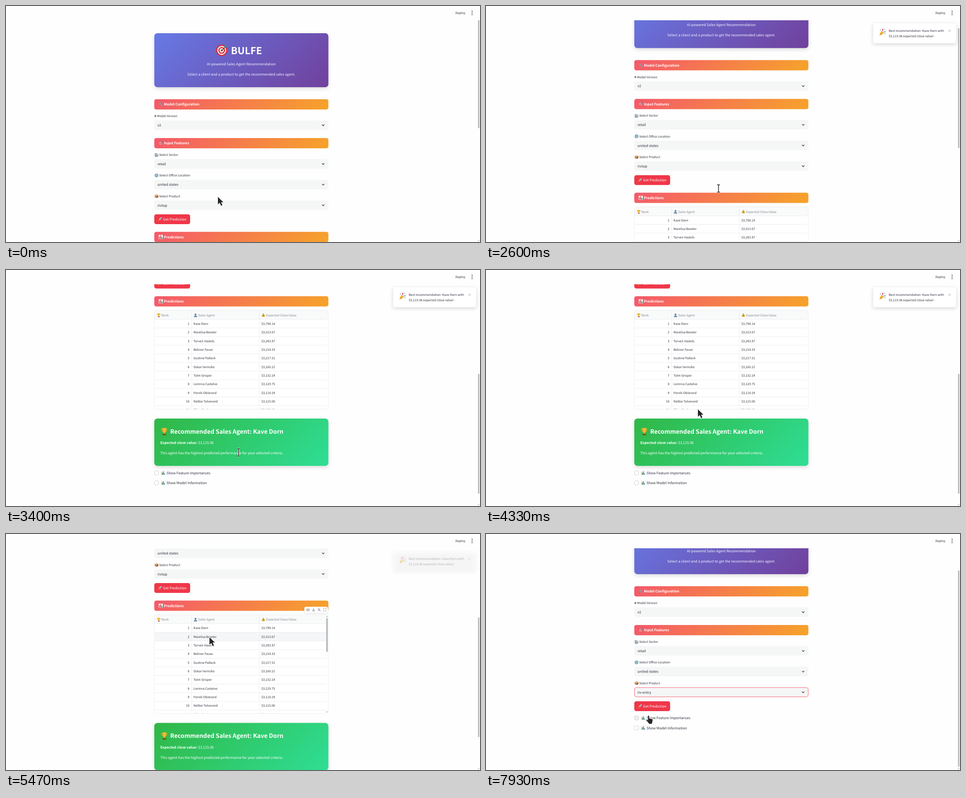
These frames come from a looping animation (1058x529 px, 8 s). An HTML page with a canvas:

```html
<!DOCTYPE html>
<html lang="en">
<head>
<meta charset="utf-8">
<title>Sales agent recommendation</title>
<style>
html, body { margin: 0; width: 100%; height: 100%; overflow: hidden; background: #fefefe; }
canvas { display: block; width: 1058px; height: 529px; font-family: 'Noto Sans CJK SC', sans-serif; }
</style>
</head>
<body>
<canvas id="stage"></canvas>
<script>
const W = 1058, H = 529, LOOP = 8000;
const LEFT = 331, WIDTH = 388.6, RIGHT = LEFT + WIDTH;
const INK = '#31333f', RED = '#ef3749';
const FAMILY = "'Noto Sans CJK SC','Noto Sans CJK JP','Noto Sans',sans-serif";
const LATIN_SCALE = 1.117; // CJK faces draw Latin larger than their nominal size

const canvas = document.getElementById('stage');
const dpr = window.devicePixelRatio || 1;
canvas.width = W * dpr;
canvas.height = H * dpr;
const ctx = canvas.getContext('2d');

const AGENTS = [
  ['Kave Dorn', '$3,798.14'], ['Marelisa Bowter', '$3,313.67'], ['Torven Haskils', '$3,283.87'],
  ['Belinor Fause', '$3,218.33'], ['Gustine Pallock', '$3,217.51'], ['Oskar Verindio', '$3,160.21'],
  ['Tolm Grisper', '$3,132.24'], ['Lorinna Castelvo', '$3,129.75'], ['Fenrik Obstrand', '$3,118.29'],
  ['Nelbie Tolverand', '$3,115.06'], ['Elbin Dosk', '$3,108.42']
];
const BEST = AGENTS[0][0];
const PRODUCTS = ['riv dual entry', 'rivtop', 'ob limited', 'riv entry', 'riv dual top', 'ob enhanced', 'ruk 300'];

// ---- icons on a 16 unit grid: [fill, path] layers ----
const dot = (x, y, r) => `M${x - r} ${y}a${r} ${r} 0 1 0 ${2 * r} 0a${r} ${r} 0 1 0 ${-2 * r} 0`;
const gearTeeth = Array.from({ length: 8 }, (_, i) => {
  const a = i * Math.PI / 4;
  return dot(8 + 6.3 * Math.cos(a), 8 + 6.3 * Math.sin(a), 1.5);
}).join('');
const ICONS = {
  target: [['#d72f3c', dot(7.7, 8.3, 7.5)], ['#f7f3f2', dot(7.7, 8.3, 5.9)], ['#d72f3c', dot(7.7, 8.3, 4.5)],
    ['#f7f3f2', dot(7.7, 8.3, 2.9)], ['#d72f3c', dot(7.7, 8.3, 1.4)], ['#3a3f4c', 'M7.4 8.3L12 3.6l.7.7L7.9 8.9z'],
    ['#3f86a8', 'M11.2 4.8L11.5 2.4 14 .2l.4 1.5 1.5.5-2.2 2.4z']],
  wrench: [['#8a9db0', 'M1 4.5a4 4 0 0 0 5.5 3.8L12 14.5a1.7 1.7 0 0 0 2.6-2.4L8.5 6.4A4 4 0 0 0 4 1l1.6 2.5-1.9 2z']],
  robot: [['#4a4c58', dot(8, 8.5, 6) + 'M7.2 0h1.6v4H7.2z'], ['#e5e6ea', 'M4 6h8v1.5H4zM4 9.5h8V11H4z']],
  building: [['#9aa3ab', 'M1 2h9v13H1zM10 5h5v10h-5z'], ['#e3edf2', 'M3 4h2v2H3zM6.5 4h2v2h-2zM3 8h2v2H3zM6.5 8h2v2h-2zM11.5 7h2v2h-2zM11.5 11h2v2h-2z'], ['#6a7077', 'M4.5 12h2.5v3H4.5z']],
  gear: [['#6c98ad', gearTeeth + dot(8, 8, 6)], ['#d5e5eb', dot(8, 8, 3.7)], ['#6c98ad', dot(8, 8, 2)]],
  box: [['#c28d58', 'M1 4.5L8 7.5v8L1 12.5z'], ['#96653b', 'M15 4.5L8 7.5v8l7-3z'], ['#d8aa74', 'M8 1.2l7 3.3-7 3-7-3z'], ['#ecd3ae', 'M4 2.9l7 3.2v2L9.4 7 2.8 3.6z']],
  rocket: [['#e66a35', 'M2 9l4-2-1.5 4.5zM9 14l-2-2 3-3z'], ['#cfd6dd', 'M15 1c-5 0-8 3-10 8l2 2c5-2 8-5 8-10z'], ['#3d6f92', dot(10.5, 5.5, 1.7)], ['#f6b42f', 'M1 15l1-4 3 3z']],
  chart: [['#cfd8dd', 'M.5.5h15v15H.5z'], ['#f8fafb', 'M1.3 1.3h13.4v13.4H1.3z'], ['#3da85a', 'M2.5 6h3v8.7h-3z'], ['#d94b48', 'M6.6 2.3h3v12.4h-3z'], ['#3f86c6', 'M10.7 8.5h3v6.2h-3z']],
  trophy: [['#d98b1f', 'M1 2.5h14c0 4-2 6-4 6H5C3 8.5 1 6.5 1 2.5zM2.4 4c.4 2 1.3 3 2.3 3.2V4zM13.6 4h-2.3v3.2c1-.2 1.9-1.2 2.3-3.2z'], ['#f7b92f', 'M3.8 1h8.4c0 5-1 8.5-3.3 9.3V13H7.1v-2.7C4.800 9.500 3.800 6 3.800 1z'], ['#7b4b2b', 'M4.500 12.500h7V15.500h-7z']],
  person: [['#5b87a0', dot(8, 5, 3.8) + 'M1.500 15.500c0-8 13-8 13 0z']],
  money: [['#e0b64a', 'M6 4h4c4 3 5 6 4.500 8.500C14 15.500 2 15.500 1.500 12.500 1 10 2 7 6 4z'], ['#c9962f', 'M5 1l3 1 3-1-1 3H6z'], ['#5e8d4a', dot(8, 10, 2.300)]],
  party: [['#f2b632', 'M1 15.500L5 5.500c3 .5 5.500 3 6 6z'], ['#d98a2c', 'M3 10.500l3.500 3-2 .8-2.300-2z'], ['#d94d57', 'M8 6C6 4 8 2 6.500.5L8 .3c2 2 0 4 1.500 5z' + dot(12, 2, .9)], ['#4b92cc', 'M10 8c2-2 3-.5 5.500-2v1.500C13 9 12 7.500 10.500 9z' + dot(3.500, 3, .9)], ['#67ab58', dot(13.500, 11.500, 1) + dot(10, 2.700, .7)]]
};
for (const name in ICONS) ICONS[name] = ICONS[name].map(([fill, d]) => [fill, new Path2D(d)]);

const ARROW = new Path2D('M0 0V16.500L4 13l3 6.700 3-1.300-3-6.500h5.200z');
const HAND = new Path2D('M1.500 1.500c0-1.700 2.800-1.700 2.800 0V7l1-.4 1.900.7 1-.2 1.500.8c1.800-.2 2.300.7 2.100 2.400-.2 3-1 4.500-1.400 8.300H3.700c-.4-3-3.500-4.500-5.700-7.600-.7-1.500.9-2.200 2-1.300l1.500 1.300z');
const BEAM = new Path2D('M-3 -8.200h2q1 0 1 1q0-1 1-1h2M0 -7.500V7.500M-3 8.200h2q1 0 1-1q0 1 1 1h2');

// ---- drawing helpers ----
function text(str, x, y, size = 8.8, { color = INK, bold = false, align = 'left' } = {}) {
  ctx.font = `${bold ? 700 : 400} ${size / LATIN_SCALE}px ${FAMILY}`;
  ctx.textAlign = align;
  ctx.fillStyle = color;
  ctx.fillText(str, x, y + size * 0.33);
  return ctx.measureText(str).width;
}
function rect(x, y, w, h, fill, r = 0) {
  ctx.beginPath();
  ctx.roundRect(x, y, w, h, r);
  ctx.fillStyle = fill;
  ctx.fill();
}
function border(x, y, w, h, r, color, width = 0.8) {
  ctx.beginPath();
  ctx.roundRect(x, y, w, h, r);
  strokeWith(color, width);
}
function strokeWith(color, width, path) {
  ctx.strokeStyle = color;
  ctx.lineWidth = width;
  path ? ctx.stroke(path) : ctx.stroke();
}
function line(color, width, ...points) {
  ctx.beginPath();
  points.forEach(([x, y]) => ctx.lineTo(x, y));
  strokeWith(color, width);
}
function shadowed(blur, dy, alpha, draw) {
  ctx.save();
  ctx.shadowColor = `rgba(0,0,0,${alpha})`;
  ctx.shadowBlur = blur * dpr;
  ctx.shadowOffsetY = dy * dpr;
  draw();
  ctx.restore();
}
function diagonal(x, y, w, h, from, to) {
  const d = (w + h) / 4, cx = x + w / 2, cy = y + h / 2;
  const g = ctx.createLinearGradient(cx - d, cy - d, cx + d, cy + d);
  g.addColorStop(0, from);
  g.addColorStop(1, to);
  return g;
}
function icon(name, cx, cy, size) {
  ctx.save();
  ctx.translate(cx - size / 2, cy - size / 2);
  ctx.scale(size / 16, size / 16);
  for (const [fill, path] of ICONS[name]) {
    ctx.fillStyle = fill;
    ctx.fill(path);
  }
  ctx.restore();
}
function triangle(x, y, dir) {
  ctx.beginPath();
  ctx.moveTo(x - 1.6, y - dir);
  ctx.lineTo(x + 1.6, y - dir);
  ctx.lineTo(x, y + dir);
  ctx.fillStyle = '#8b8d92';
  ctx.fill();
}

// ---- motion ----
const clamp = v => Math.max(0, Math.min(1, v));
const smooth = v => { v = clamp(v); return v * v * (3 - 2 * v); };
const span = (t, a, b) => smooth((t - a) / (b - a));

const NOTCH = 89.5, BOTTOM = 5 * NOTCH, SHORT_MAX = 92;
const WHEEL = [2440, 2590, 2735, 2910, 3170];
const OPEN = 5980, PICK = 6870, RERUN = 7000;

function scrollAt(t) {
  if (t >= RERUN) return SHORT_MAX;
  const down = WHEEL.reduce((sum, start) => sum + NOTCH * span(t, start, start + 180), 0);
  return down - 90.5 * span(t, 4680, 4900);
}
const MOVES = [
  [0, 473, 428], [270, 519, 409], [3400, 519, 409], [4130, 481, 325], [4650, 457, 287],
  [5330, 457, 287], [5730, 447, 92], [6000, 447, 92], [6330, 421, 169], [6500, 421, 177],
  [6900, 421, 177], [7930, 360, 407]
];
function pointerAt(t) {
  let i = 0;
  while (i < MOVES.length - 2 && t >= MOVES[i + 1][0]) i++;
  const [t0, x0, y0] = MOVES[i], [t1, x1, y1] = MOVES[i + 1], k = span(t, t0, t1);
  return [x0 + (x1 - x0) * k, y0 + (y1 - y0) * k];
}
const SHAPES = [[0, 'arrow'], [200, 'beam'], [3560, 'arrow'], [5640, 'beam'], [6090, 'hand'], [6950, 'arrow'], [7600, 'hand']];
const shapeAt = t => SHAPES.filter(([start]) => t >= start).pop()[1];

// ---- page parts, in page coordinates ----
function banner() {
  shadowed(9, 3, 0.15, () => rect(LEFT, 61, WIDTH, 121, diagonal(LEFT, 61, WIDTH, 121, '#667ae5', '#71409c'), 7));
  icon('target', 482, 99, 27);
  text('BULFE', 502, 100, 24.2, { color: '#fff', bold: true });
  const white = { color: '#f7f6fc', align: 'center' };
  text('AI-powered Sales Agent Recommendation', 525.3, 130, 8.8, white);
  text('Select a client and a product to get the recommended sales agent.', 525.3, 153, 8.8, white);
}
function section(y, name, title) {
  rect(LEFT, y, WIDTH, 23, diagonal(LEFT, y, WIDTH, 23, '#f4586b', '#f6a429'), 4.5);
  icon(name, 345.5, y + 11.5, 10);
  text(title, 352.5, y + 11.5, 8.8, { color: '#fff', bold: true });
}
function select(y, name, label, value, focused) {
  const small = name === 'robot';
  icon(name, small ? 333.5 : 336, y - 20.5, small ? 5.5 : 9.5);
  text(label, small ? 337.3 : 342, y - 20.5, 7.7);
  rect(LEFT, y - 10.7, WIDTH, 21.4, '#f5f6f6', 4.5);
  if (focused) border(LEFT + 0.4, y - 10.4, WIDTH - 0.8, 20.8, 4.5, '#f0525f', 0.9);
  text(value, 338, y);
  line(INK, 1.3, [705.4, y - 1.4], [708, y + 1.3], [710.6, y - 1.4]);
}
function button() {
  rect(LEFT, 467, 80, 22, RED, 4.5);
  icon('rocket', 343.5, 478, 9.5);
  text('Get Prediction', 350.5, 478, 8.8, { color: '#fff' });
}

const TABLE = { top: 538, head: 558, bottom: 759.5, row: 19.35 };
function table(hoverRow) {
  const { top, head, bottom, row } = TABLE, grid = '#e9eaec';
  ctx.save();
  ctx.beginPath();
  ctx.roundRect(LEFT, top, WIDTH, bottom - top, 4.5);
  ctx.clip();
  rect(LEFT, top, WIDTH, bottom - top, '#fff');
  rect(LEFT, top, WIDTH, head - top, '#f9fafa');
  const gray = { color: '#84868f' };
  [['trophy', 341, 'Rank', 347], ['person', 423, 'Sales Agent', 429], ['money', 574.5, 'Expected Close Value', 580.7]]
    .forEach(([name, ix, title, x]) => { icon(name, ix, top + 10.7, 9); text(title, x, top + 10.7, 7.7, gray); });
  AGENTS.forEach(([agent, value], i) => {
    const y = head + i * row, mid = y + 9.8;
    if (i === hoverRow) rect(LEFT, y, 385, row, '#f5f6f7');
    line(grid, 0.8, [LEFT, y], [716, y]);
    text(i + 1, 409.3, mid, 7.7, { align: 'right' });
    text(agent, 418.5, mid, 7.7);
    text(value, 570, mid, 7.7);
  });
  for (const x of [414.5, 565.5]) line(grid, 0.8, [x, top], [x, bottom]);
  if (hoverRow >= 0) {
    rect(714.8, top + 7.5, 3.4, 75.5, '#b4b6b9', 1.5);
    triangle(716.5, top + 4, -1);
    triangle(716.5, bottom - 3.5, 1);
  }
  ctx.restore();
  border(LEFT + 0.4, top, WIDTH - 0.8, bottom - top, 4.5, grid);
  if (hoverRow >= 0) toolbar(527);
}
function toolbar(y) {
  const c = '#74767f';
  shadowed(3, 1, 0.12, () => rect(666, y - 7, 52.5, 14, '#fff', 4));
  ctx.beginPath();
  ctx.ellipse(674, y, 3.6, 2.3, 0, 0, 7);
  strokeWith(c, 0.9);
  rect(672.9, y - 1.1, 2.2, 2.2, c, 1.1);
  line(c, 0.9, [686.5, y - 3], [686.5, y + 1]);
  line(c, 0.9, [684.700, y - 0.7], [686.5, y + 1.2], [688.300, y - 0.7]);
  line(c, 0.9, [683.900, y + 1.200], [683.900, y + 2.700], [689.100, y + 2.700], [689.100, y + 1.200]);
  ctx.beginPath();
  ctx.arc(698.300, y - 0.7, 1.900, 0, 7);
  strokeWith(c, 1);
  line(c, 1.1, [699.600, y + 0.600], [701.800, y + 2.800]);
  for (const sx of [-1, 1]) for (const sy of [-1, 1])
    line(c, 0.9, [711.5 + sx, y + 2.600 * sy], [711.5 + 2.600 * sx, y + 2.600 * sy], [711.5 + 2.600 * sx, y + sy]);
}
function resultCard() {
  const y = 780.5, h = 106, white = { color: '#fff' }, strong = { color: '#fff', bold: true };
  shadowed(9, 3, 0.15, () => rect(LEFT, y, WIDTH, h, diagonal(LEFT, y, WIDTH, h, '#30b746', '#2fde95'), 7));
  icon('trophy', 353.5, y + 29, 18);
  text(`Recommended Sales Agent: ${BEST}`, 366.5, y + 29, 14.9, strong);
  const w = text('Expected close value:', 344.5, y + 54.5, 8.8, strong);
  text('$3,115.06', 344.5 + w + 1.8, y + 54.5, 8.8, white);
  text('This agent has the highest predicted performance for your selected criteria.', 344.5, y + 77.5, 8.8, white);
}
function checkbox(y, label, hovered) {
  rect(331.5, y - 4.5, 9, 9, hovered ? '#f0f1f4' : '#fff', 2);
  border(331.5, y - 4.5, 9, 9, 2, '#c3c5ca');
  icon('chart', 351, y, 9.5);
  text(label, 358.3, y);
}
function page(t, scroll, pointer) {
  const done = t >= RERUN;
  banner();
  section(209, 'wrench', 'Model Configuration');
  select(267.2, 'robot', 'Model Version', 'v2');
  section(296, 'target', 'Input Features');
  select(354, 'building', 'Select Sector', 'retail');
  select(400.3, 'gear', 'Select Office Location', 'united states');
  select(446.6, 'box', 'Select Product', PRODUCTS[t >= PICK ? 3 : 1], t >= OPEN);
  button();
  if (!done) {
    section(506.2, 'chart', 'Predictions');
    table(hoveredRow(t, pointer));
    resultCard();
  }
  const y = done ? 504.5 : 902.5;
  checkbox(y, 'Show Feature Importances', t > 7800);
  checkbox(y + 22.1, 'Show Model Information');
}
function hoveredRow(t, [, y]) {
  if (t < 4130 || t > 5730) return -1;
  // the highlighted row only updates when the pointer moves
  const pageY = y + (t < 5330 ? BOTTOM : BOTTOM - 90.5);
  return pageY < TABLE.bottom ? Math.floor((pageY - TABLE.head) / TABLE.row) : -1;
}

// ---- fixed parts ----
function menu(t, [, py]) {
  const top = 101, row = 22.07;
  shadowed(8, 3, 0.16, () => rect(LEFT, top, WIDTH, 155, '#fff', 4.5));
  const hot = t < 6400 ? (py < 123 ? 0 : py < 145 ? 1 : 2) : 3;
  rect(LEFT, top + row, WIDTH, row, '#f9fafa');
  if (t > 6090) rect(LEFT, top + hot * row, WIDTH, row, '#eff0f1');
  PRODUCTS.forEach((name, i) => text(name, 340, 112 + i * row));
  ctx.font = `${8.8 / LATIN_SCALE}px ${FAMILY}`;
  const x = 338.8 + ctx.measureText(PRODUCTS[1]).width;
  line(INK, 0.7, [x, 84.5], [x, 94.5]);
}
function toast(alpha) {
  if (alpha <= 0) return;
  ctx.save();
  ctx.globalAlpha = alpha;
  shadowed(9, 2.5, 0.17, () => rect(864, 38.5, 185.5, 45, '#fff', 4.5));
  icon('party', 885, 58.5, 16);
  text(`Best recommendation: ${BEST} with`, 899, 55.5, 7.7);
  text('$3,115.06 expected close value!', 899, 67.8, 7.7);
  line('#85878f', 0.8, [1032.6, 53.4], [1036.8, 57.6]);
  line('#85878f', 0.8, [1036.8, 53.4], [1032.6, 57.6]);
  ctx.restore();
}
function scrollbar(t, scroll) {
  const height = t >= RERUN ? H + SHORT_MAX : 1017, track = 517;
  rect(1053.6, 5 + scroll / height * track, 3, H / height * track, '#b5b7ba', 1.5);
  triangle(1055, 526.5, 1);
}
function header() {
  rect(0, 0, W, 32, '#fefefe');
  text('Deploy', 1003, 15.3, 7.7);
  for (const y of [11.6, 15.5, 19.4]) rect(1039.3, y - 1.1, 2.2, 2.2, INK, 1.1);
}
function pointerShape(shape, [x, y]) {
  ctx.save();
  ctx.translate(x, y);
  ctx.lineJoin = 'round';
  if (shape === 'beam') {
    strokeWith('#fff', 3.2, BEAM);
    strokeWith('#161616', 1.4, BEAM);
  } else {
    const path = shape === 'hand' ? HAND : ARROW;
    strokeWith('#fff', 2, path);
    ctx.fillStyle = '#262626';
    ctx.fill(path);
  }
  ctx.restore();
}

function draw(t) {
  const scroll = scrollAt(t), pointer = pointerAt(t), open = t >= OPEN && t < PICK;
  ctx.setTransform(dpr, 0, 0, dpr, 0, 0);
  ctx.textRendering = 'geometricPrecision';
  rect(0, 0, W, H, '#fefefe');
  ctx.save();
  ctx.translate(0, -scroll);
  page(t, scroll, pointer);
  ctx.restore();
  if (open) menu(t, pointer);
  else scrollbar(t, scroll);
  header();
  toast(span(t, 670, 900) * (1 - span(t, 5330, 5560)));
  pointerShape(shapeAt(t), pointer);
}

const start = performance.now();
function tick() {
  draw((performance.now() - start) % LOOP);
  requestAnimationFrame(tick);
}
tick();
</script>
</body>
</html>
```
